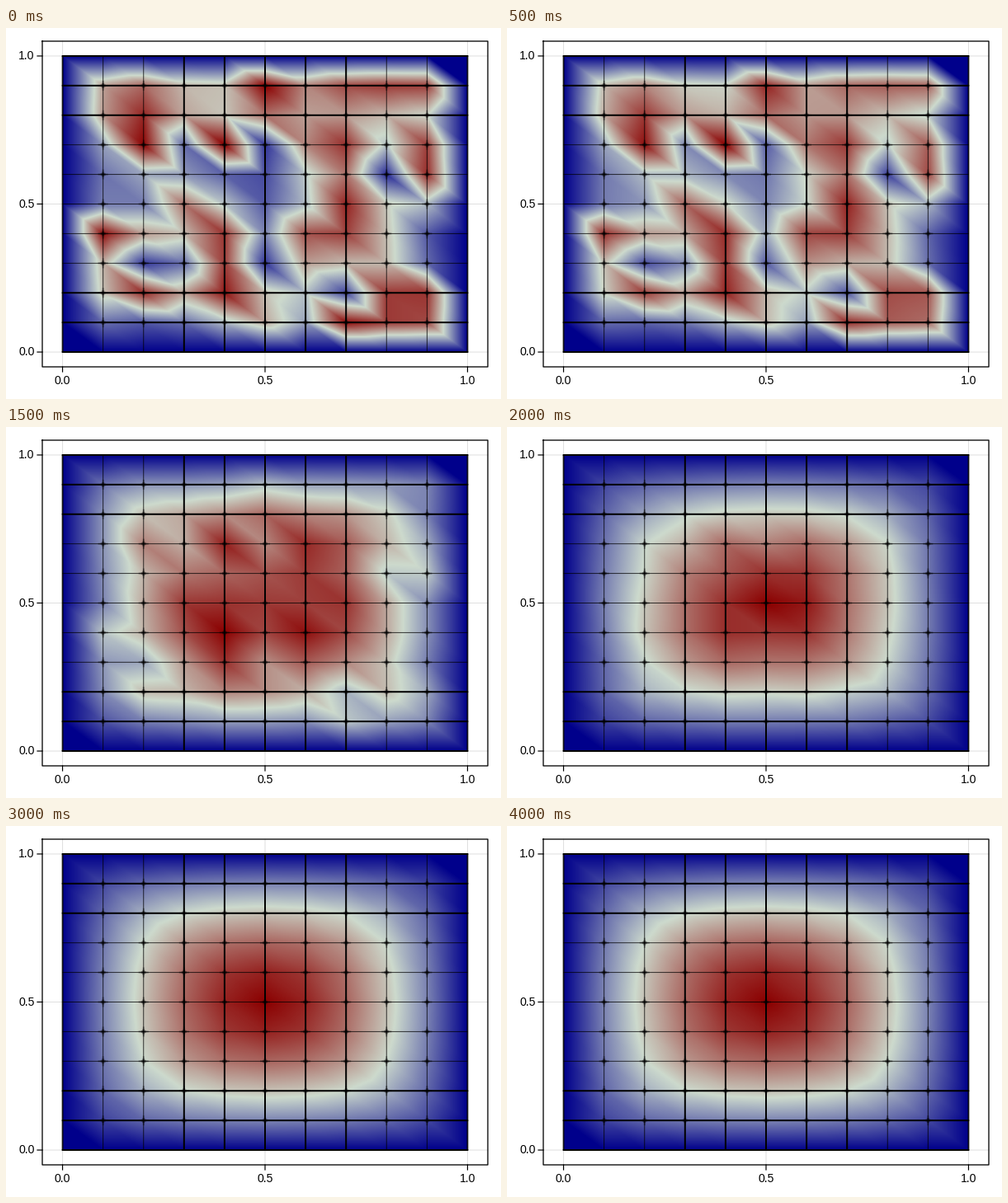
A matplotlib script for the animation above (4500 ms loop, 600x450 px).

```python
import numpy as np
import matplotlib.pyplot as plt
from matplotlib.animation import FuncAnimation
from matplotlib.colors import LinearSegmentedColormap

DPI = 100
PX = 72 / DPI                      # one pixel in points
X0, Y0, W, H = 68.55, 393.05, 490.9, 359.1
N = 10                             # cells per side
STEPS = 9

# Starting values (percent) at the inner nodes, bottom row first.
START = [
    [25, 20, 25, 42, 60, 37, 95, 85, 82],
    [55, 88, 62, 93, 55, 43, 16, 85, 86],
    [58, 13, 24, 84, 12, 63, 57, 56, 24],
    [95, 63, 56, 86, 30, 80, 84, 55, 20],
    [28, 28, 72, 44, 20, 42, 90, 53, 42],
    [26, 37, 34, 22, 17, 45, 72, 10, 88],
    [36, 97, 24, 98, 12, 68, 87, 44, 84],
    [64, 89, 61, 54, 73, 62, 64, 57, 50],
    [62, 75, 57, 55, 98, 68, 82, 85, 84],
]
AMPLITUDE = 0.4


def gradient_matrices():
    """Gradient of linear elements, two triangles per cell."""
    node = np.arange((N + 1) ** 2).reshape(N + 1, N + 1)
    dx = np.zeros((2 * N * N, node.size))
    dy = np.zeros_like(dx)
    t = 0
    for j in range(N):
        for i in range(N):
            a, b = node[j, i], node[j, i + 1]
            c, d = node[j + 1, i], node[j + 1, i + 1]
            dx[t, [b, a]] = N, -N
            dy[t, [c, a]] = N, -N
            dx[t + 1, [d, c]] = N, -N
            dy[t + 1, [d, b]] = N, -N
            t += 2
    return dx, dy


def solve_steps():
    """Newton iterates of the p-Laplace problem with p = 3 and unit load."""
    inner = np.zeros((N + 1, N + 1), bool)
    inner[1:-1, 1:-1] = True
    dx, dy = (m[:, inner.ravel()] for m in gradient_matrices())
    area = 0.5 / N ** 2
    u = AMPLITUDE * np.array(START, float).ravel() / 100
    fields = []
    for _ in range(STEPS):
        full = np.zeros((N + 1, N + 1))
        full[inner] = u
        fields.append(full / full.max())
        gx, gy = dx @ u, dy @ u
        g = np.hypot(gx, gy) + 1e-7
        res = area * (dx.T @ (g * gx) + dy.T @ (g * gy)) - 1 / N ** 2
        kxx, kyy, kxy = g + gx * gx / g, g + gy * gy / g, gx * gy / g
        jac = area * (dx.T @ (kxx[:, None] * dx + kxy[:, None] * dy)
                      + dy.T @ (kxy[:, None] * dx + kyy[:, None] * dy))
        u = u - np.linalg.solve(jac, res)
    return fields


def shade(u):
    """Linear interpolation inside each triangle, one value per pixel."""
    x = (np.arange(69, 559) + 0.5 - X0) / W * N
    y = (Y0 - np.arange(34, 393) - 0.5) / H * N
    x, y = np.meshgrid(x, y)
    i = np.clip(x.astype(int), 0, N - 1)
    j = np.clip(y.astype(int), 0, N - 1)
    a, b = x - i, y - j
    u00, u10 = u[j, i], u[j, i + 1]
    u01, u11 = u[j + 1, i], u[j + 1, i + 1]
    low = u00 + a * (u10 - u00) + b * (u01 - u00)
    high = u11 + (1 - a) * (u01 - u11) + (1 - b) * (u10 - u11)
    return np.where(a + b <= 1, low, high)


fig = plt.figure(figsize=(600 / DPI, 450 / DPI), dpi=DPI, facecolor="white")
ax = fig.add_axes([0, 0, 1, 1])
ax.set_xlim(0, 600)
ax.set_ylim(450, 0)
ax.axis("off")


def line(x, y, width, color="black", z=5, **kw):
    ax.plot(x, y, color=color, lw=width * PX, zorder=z, snap=False, **kw)


def px(u):
    return X0 + W * u


def py(v):
    return Y0 - H * v


# Axis frame, light grid, ticks and labels
for v in (0, 0.5, 1):
    line([px(v)] * 2, [16, 411], 1, "#dfdfdf", 1)
    line([44, 584], [py(v)] * 2, 1, "#dfdfdf", 1)
    line([px(v)] * 2, [411, 417], 1.2)
    line([38, 44], [py(v)] * 2, 1.2)
    font = dict(family="Liberation Sans", size=14 * PX, color="black")
    ax.text(px(v), 427.5, f"{v:.1f}", ha="center", va="center", **font)
    ax.text(34.5, py(v) + 0.3, f"{v:.1f}", ha="right", va="center", **font)
line([44, 584, 584, 44, 44], [16, 16, 411, 411, 16], 1.3)

cmap = LinearSegmentedColormap.from_list(
    "heat", ["#00008b", "#cddacd", "#8b0000"], N=512)
fields = [shade(u) for u in solve_steps()]
image = ax.imshow(fields[0], cmap=cmap, vmin=0, vmax=1, zorder=3,
                  extent=(69, 559, 393, 34), aspect="auto",
                  interpolation="nearest")
ax.set_xlim(0, 600)
ax.set_ylim(450, 0)

# Mesh lines: some heavy, the others thin
for k in range(N + 1):
    s = k / N
    heavy_col = 3 <= k <= 7
    heavy_row = k in (0, 1, 2, 8, 9, 10)
    width, alpha = (2, 1) if heavy_col else (1, 0.75)
    if k in (0, N):
        width, alpha = 1.8, 0.9
    line([px(s)] * 2, [py(0), py(1)], width, alpha=alpha,
         solid_capstyle="round")
    width, alpha = (2, 1) if heavy_row else (1, 0.75)
    line([px(0), px(1)], [py(s)] * 2, width, alpha=alpha,
         solid_capstyle="round")

# Small dark crosses where mesh lines meet
for i in range(1, N):
    for j in range(1, N):
        x, y = px(i / N), py(j / N)
        for r, width, alpha in ((6, 1.8, 0.4), (3, 3, 0.4)):
            line([x - r, x + r], [y, y], width, alpha=alpha,
                 solid_capstyle="butt")
            line([x, x], [y - r, y + r], width, alpha=alpha,
                 solid_capstyle="butt")


def draw(k):
    image.set_data(fields[k % STEPS])
    return [image]


anim = FuncAnimation(fig, draw, frames=STEPS, interval=500,
                     repeat=True, repeat_delay=0, blit=False)
plt.show()
```
